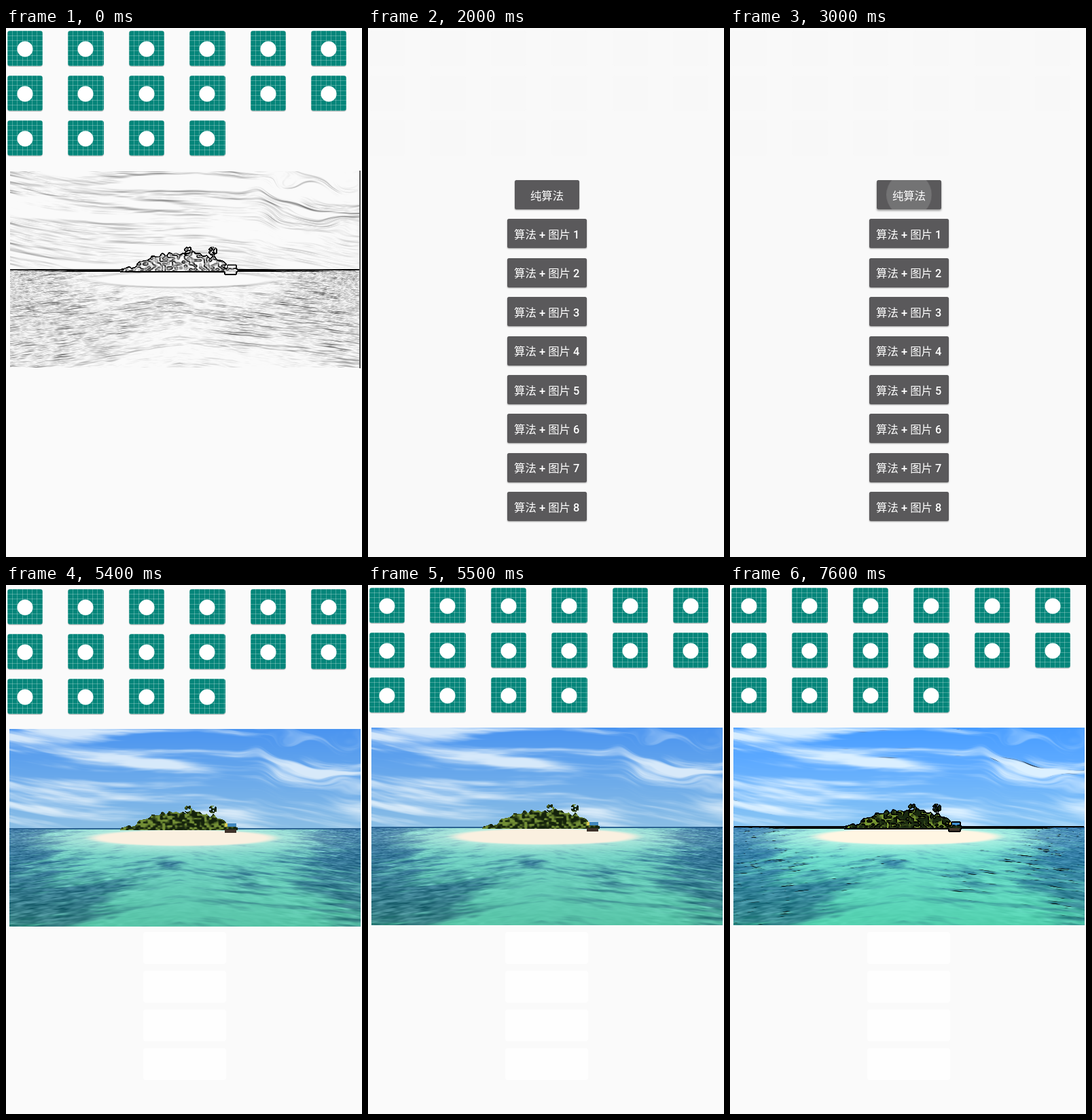
Write an HTML page with a canvas that moves like this. It is 524 px wide and 779 px high and loops after 8000 ms.

```html
<!DOCTYPE html>
<html lang="zh-CN">
<head>
<meta charset="utf-8">
<title>Image filters</title>
<style>
html, body { margin: 0; width: 100%; height: 100%; overflow: hidden; background: #fafafa; }
#stage { position: relative; width: 524px; height: 779px; overflow: hidden; background: #fafafa; }
#gallery, #menu, #faint { position: absolute; inset: 0; }
#gallery { animation: gallery 8s step-end infinite; }
#menu { background: #f9f9f9; animation: menu 8s step-end infinite; }
#faint { animation: faint 8s step-end infinite; }
.tile, .dim, canvas, .btn, .pale { position: absolute; }
.tile, .dim { width: 52.5px; height: 52.5px; border-radius: 4px; }
.tile {
  --line: #ffffff40 0 .8px, #fff0 .8px 7.25px;
  background:
    radial-gradient(circle at 26px 27px, #fff 11px, #fff0 12px),
    repeating-linear-gradient(90deg, var(--line)),
    repeating-linear-gradient(var(--line)),
    #05857a;
  box-shadow: 0 1px 1px #0004;
}
.dim { background: #f8f8f8; }
canvas { left: 5px; top: 210px; }
#photo { animation: photo 8s step-end infinite; }
#cartoon { animation: cartoon 8s step-end infinite; }
#sketch { animation: sketch 8s step-end infinite; }
.pale { left: 202px; width: 122px; height: 47px; border-radius: 4px; background: #fefefe; }
.btn {
  left: 204.5px; width: 117.5px; height: 43px; border-radius: 2.5px; overflow: hidden;
  display: flex; align-items: center; justify-content: center;
  background: #5a595b; color: #fff; white-space: pre;
  font: 500 16.4px Roboto, "Noto Sans CJK SC", "Noto Sans CJK", sans-serif;
  box-shadow: 0 1px 2px #0006;
}
.btn:first-child { left: 216px; width: 95px; animation: lift 8s step-end infinite; }
.btn:first-child::after {
  content: ""; position: absolute; left: -8px; top: -34px; width: 111px; height: 111px;
  border-radius: 50%; background: #fff; opacity: 0; animation: ripple 8s step-end infinite;
}
@keyframes gallery {
  0% { opacity: 1; transform: none; }
  25% { opacity: 0; transform: none; }
  67.5% { opacity: 1; transform: translateY(2px); }
  68.75%, 100% { opacity: 1; transform: none; }
}
@keyframes menu { 0% { opacity: 0; } 25% { opacity: 1; } 67.5%, 100% { opacity: 0; } }
@keyframes faint { 0% { opacity: 0; } 67.5%, 100% { opacity: 1; } }
@keyframes photo { 0% { opacity: 0; } 67.5% { opacity: 1; } 81.25%, 100% { opacity: 0; } }
@keyframes sketch { 0% { opacity: 1; } 6.25% { opacity: 0; } 81.25% { opacity: 1; } 95%, 100% { opacity: 0; } }
@keyframes cartoon { 0% { opacity: 0; } 6.25% { opacity: 1; } 25% { opacity: 0; } 95%, 100% { opacity: 1; } }
@keyframes lift {
  0% { box-shadow: 0 1px 2px #0006; }
  37.5% { box-shadow: 0 2px 3px #0006; }
  38.75% { box-shadow: 0 3px 4px #0006; }
  40% { box-shadow: 0 2px 3px #0006; }
  41.25%, 100% { box-shadow: 0 1px 2px #0006; }
}
@keyframes ripple {
  0% { opacity: 0; transform: scale(.3); }
  37.5% { opacity: .16; transform: scale(.6); }
  38.75% { opacity: .2; transform: scale(1); }
  40% { opacity: .1; transform: scale(1); }
  41.25%, 100% { opacity: 0; transform: scale(1); }
}
</style>
</head>
<body>
<div id="stage">
  <div id="gallery">
    <canvas id="photo" width="517" height="291"></canvas>
    <canvas id="cartoon" width="517" height="291"></canvas>
    <canvas id="sketch" width="517" height="291"></canvas>
  </div>
  <div id="faint"></div>
  <div id="menu"></div>
</div>
<script>
const W = 517, H = 291, HORIZON = 146;
const $ = id => document.getElementById(id);

function add(parent, cls, top, left, text = '') {
  const el = document.createElement('div');
  el.className = cls;
  el.style.top = top + 'px';
  if (left !== undefined) el.style.left = left + 'px';
  el.textContent = text;
  $(parent).append(el);
}

for (let i = 0; i < 9; i++) add('menu', 'btn', 224 + i * 57.4, undefined, i ? `算法 + 图片 ${i}` : '纯算法');
for (let i = 0; i < 16; i++) {
  const top = 3.7 + Math.floor(i / 6) * 65.9, left = 1.7 + (i % 6) * 89.45;
  add('gallery', 'tile', top, left);
  add('menu', 'dim', top, left);
}
for (let i = 0; i < 4; i++) add('faint', 'pale', 510.5 + i * 57.3);

const lerp = (a, b, t) => a + (b - a) * t;
const mix = (a, b, t) => a.map((v, i) => lerp(v, b[i], t));
const luma = ([r, g, b]) => .3 * r + .59 * g + .11 * b;
const spot = (x, y, cx, cy, rx, ry) => Math.exp(-(((x - cx) / rx) ** 2) - ((y - cy) / ry) ** 2);

function ramp(a, b, v) {
  const t = Math.min(1, Math.max(0, (v - a) / (b - a)));
  return t * t * (3 - 2 * t);
}

function hash(x, y) {
  let h = Math.imul(x, 374761393) + Math.imul(y, 668265263);
  h = Math.imul(h ^ (h >>> 13), 1274126177);
  return ((h ^ (h >>> 16)) >>> 0) / 4294967296;
}

function noise(x, y) {
  const i = Math.floor(x), j = Math.floor(y);
  const u = ramp(0, 1, x - i), v = ramp(0, 1, y - j);
  return lerp(lerp(hash(i, j), hash(i + 1, j), u), lerp(hash(i, j + 1), hash(i + 1, j + 1), u), v);
}

function layers(x, y, count) {
  let sum = 0, total = 0;
  for (let k = 0, a = 1; k < count; k++, a /= 2) {
    sum += a * noise(x * 2 ** k + k * 17, y * 2 ** k + k * 31);
    total += a;
  }
  return sum / total;
}

function sky(x, y) {
  const d = y / HORIZON;
  const curl = ramp(320, 400, x) * (1 - d) * 50 * (noise(x / 45, y / 25) - .5);
  const streak = layers(x / 110, (y - 8 * Math.sin(x / 70) - .1 * x + curl) / 10, 4);
  const mass = .16 * d
    + .5 * spot(x, y, 50, 5, 110, 13)
    + .45 * spot(x, y - .12 * (x - 220), 220, 54, 110, 12)
    + .5 * spot(x, y + curl * .4, 450, 62, 80, 18)
    - .15 * spot(x, y, 200, 30, 150, 14);
  const blue = mix([74, 148, 240], [138, 190, 229], d);
  return mix(blue, [235, 245, 252], .85 * ramp(.45, 1.02, streak + mass));
}

function sea(x, y) {
  const d = (y - HORIZON) / (H - HORIZON), near = .35 + d, off = Math.abs(x - 250);
  const row = 30 * Math.log(near) - .022 * off / near, col = (x - 250) / near;
  const beach = spot(x, y, 250, 160, 175, 18);
  const weed = (1 - beach) * Math.min(1, ramp(.4, 1, off / 260) * (1 - .6 * d)
    + .55 * spot(x, y + .3 * (x - 130), 130, 238, 80, 26)
    + .45 * spot(x, y, 40, 265, 90, 45)
    + .5 * spot(x, y, 345, 224, 36, 24)
    + .5 * spot(x, y, 236, 200, 17, 7));
  const dark = ramp(.35, .85, .7 * layers(col / 40, row, 3) + .6 * weed);
  const wave = (layers(col / 11, row * 2.2, 2) - .5) * (12 + 85 * weed) * (1 - beach);
  const shallow = mix([125, 215, 208], [88, 198, 168], d);
  const deep = mix([48, 110, 158], [52, 124, 128], d);
  const water = mix(mix(shallow, deep, dark), [215, 246, 233], beach).map(v => v + wave);
  const sand = 1 - ramp(.85, 1.08, Math.hypot((x - 255) / 140, (y - 160) / 12));
  return y < HORIZON + 2 ? [42, 98, 146] : mix(water, [250, 240, 224], sand);
}

function island(x, y) {
  const t = (x - 162) / 174, base = HORIZON + 3;
  if (y < base && t > 0 && t < 1) {
    const rise = 27 * (1 - Math.abs(2 * t - 1) ** 3) * (.6 + .4 * ramp(.1, .35, t));
    const top = base - rise - 7 * (noise(x / 5, 3) - .5);
    const palm = [263, 299].some(px => Math.hypot(x - px, y - 118) < 6 && noise(x / 2.5, y / 2.5) > .42);
    if (y > top || palm) return mix([20, 34, 12], [116, 144, 54], ramp(.25, .85, noise(x / 3.6, y / 2.8)));
  }
  return null;
}

function parasol(x, y) {
  if (Math.abs(x - 325) > 8) return null;
  if (Math.abs(y - 141) < 3) return x < 321 ? [215, 200, 85] : [65, 135, 190];
  return Math.abs(y - 150) < 3 ? [62, 50, 42] : null;
}

const scene = [];
for (let y = 0; y < H; y++) {
  for (let x = 0; x < W; x++) {
    scene.push(parasol(x, y) || island(x, y) || (y < HORIZON ? sky(x, y) : sea(x, y)));
  }
}
const gray = scene.map(luma);

// Edge strength from neighbouring brightness
const edges = gray.map((v, i) => {
  const x = i % W;
  if (!x || x === W - 1 || i < W || i >= W * (H - 1)) return 0;
  return Math.hypot(gray[i + 1] - gray[i - 1], gray[i + W] - gray[i - W]);
});

function render(id, shade) {
  const c = $(id).getContext('2d'), img = c.createImageData(W, H);
  scene.forEach((color, i) => img.data.set([...shade(color, i), 255], i * 4));
  c.putImageData(img, 0, 0);
}

render('photo', color => color);
render('cartoon', (color, i) => {
  const ink = ramp(32, 75, edges[i]);
  return color.map(v => (lerp(gray[i], v, 1.15) + 6) * (1 - ink));
});
render('sketch', (color, i) => {
  const v = i % W > W - 3 ? 90 : 250 - 2.3 * Math.max(0, edges[i] - 2);
  return [v, v, v];
});
</script>
</body>
</html>
```
